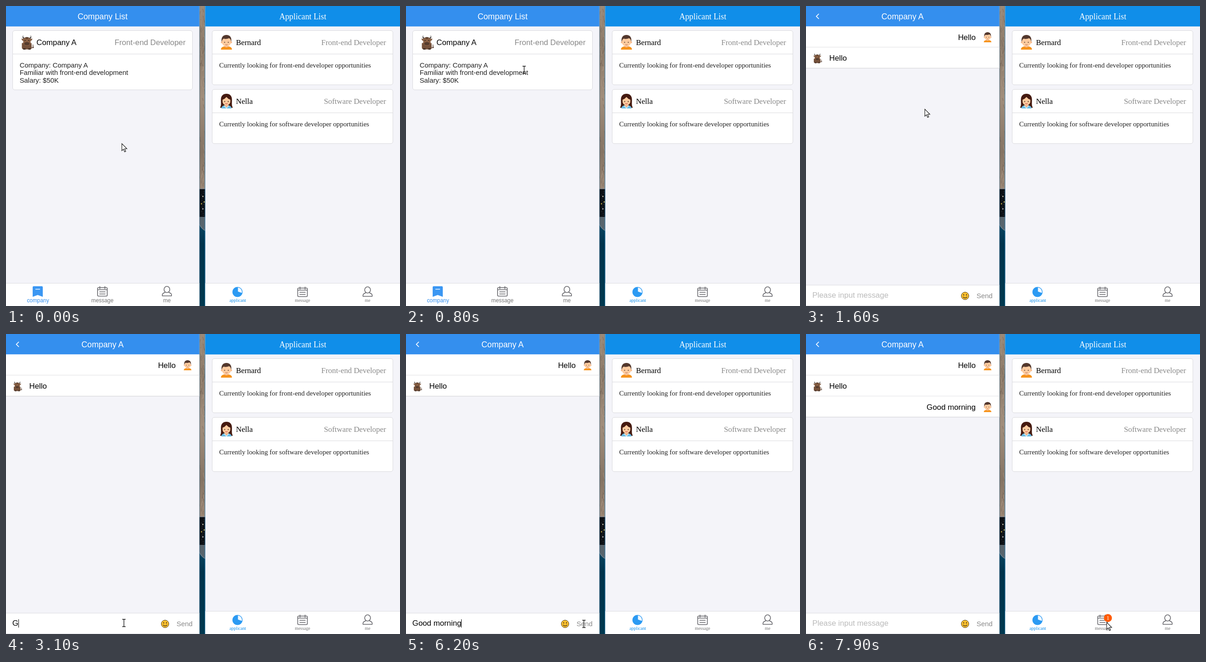
These frames come from a looping animation (857 px wide and 653 px high, 8 s). An HTML page:

```html
<!DOCTYPE html>
<html lang="en">
<head>
<meta charset="utf-8">
<title>Job chat</title>
<style>
  html, body { margin: 0; width: 100%; height: 100%; overflow: hidden; background: #f4f4f9; }
  svg { display: block; }
  text { white-space: pre; font-family: "Liberation Sans", Arial, sans-serif; }
  .serif text { font-family: "Liberation Serif", "Times New Roman", serif; }
  .line { fill: none; stroke: #66666b; stroke-width: 1.6; stroke-linecap: round; stroke-linejoin: round; }
</style>
</head>
<body>
<svg id="stage" width="857" height="653" viewBox="0 0 857 653">
  <defs>
    <linearGradient id="rock" x1="0" x2="0" y1="0" y2="1">
      <stop offset="0" stop-color="#9c8a78"/><stop offset=".25" stop-color="#8c7a69"/>
      <stop offset=".5" stop-color="#a18e7c"/><stop offset=".8" stop-color="#857464"/>
      <stop offset="1" stop-color="#9b8775"/>
    </linearGradient>
    <linearGradient id="sea" x1="0" x2="0" y1="0" y2="1">
      <stop offset="0" stop-color="#0b4a68"/><stop offset=".3" stop-color="#00334c"/>
      <stop offset="1" stop-color="#00384f"/>
    </linearGradient>
    <clipPath id="gap"><rect x="420" width="14" height="653"/></clipPath>

    <g id="boy">
      <path d="M-12 16C-12 11-8 9.500-4 9H4C8 9.500 12 11 12 16Z" fill="#f7941d"/>
      <path d="M-4 5H4V9.500Q0 13-4 9.500Z" fill="#eeb083"/>
      <circle cx="-10" cy="0" r="2.200" fill="#f5b88b"/>
      <circle cx="10" cy="0" r="2.200" fill="#f5b88b"/>
      <path d="M-9.500-9H9.500V0C9.500 6 4 9.500 0 9.500S-9.500 6-9.500 0Z" fill="#fdcb9f"/>
      <path d="M-10.500-1C-12-11-7-16 0-16S12-11 10.500-1L9-6Q7-8 6-9Q-1-6-6-8Q-8-7-9-5Z" fill="#53382d"/>
      <circle cx="-4" cy="0" r="1.100" fill="#4a342b"/><circle cx="4" cy="0" r="1.100" fill="#4a342b"/>
      <path d="M-2.500 5Q0 6.800 2.500 5" fill="none" stroke="#b5624a"/>
    </g>
    <g id="girl">
      <path d="M-14 14C-11 10-12 5-12-3C-12-12-7-16 0-16S12-12 12-3C12 5 11 10 14 14Q10 16 7 13H-7Q-10 16-14 14Z" fill="#451a10"/>
      <path d="M-11 16C-11 12-8 10-4 9H4C8 10 11 12 11 16Z" fill="#68bde5"/>
      <path d="M-4 5H4V10L0 14L-4 10Z" fill="#f0b489"/>
      <path d="M-5 10L0 15.500L5 10" fill="none" stroke="#d9f0fa" stroke-width="1.500"/>
      <path d="M-8.500-3Q-3-5 0-9Q3-5 8.500-3V1C8.500 6 4 9 0 9S-8.500 6-8.500 1Z" fill="#fdcb9f"/>
      <circle cx="-3.800" cy="1" r="1.100" fill="#3b211a"/><circle cx="3.800" cy="1" r="1.100" fill="#3b211a"/>
      <path d="M-2.500 5Q0 7 2.500 5" fill="none" stroke="#d24d4d" stroke-width="1.300"/>
    </g>
    <g id="bull">
      <path d="M9 12Q15 13 13 5" fill="none" stroke="#5c4030" stroke-width="1.300"/>
      <circle cx="13.500" cy="11" r="1.500" fill="#4a3429"/>
      <path d="M-11 2Q0-3 10 2L10.500 12Q10 15 7 15.500H-7Q-11 15-11 11Z" fill="#73503a"/>
      <path d="M-8 13H-3V16H-8ZM3 13H8V16H3Z" fill="#443127"/>
      <path d="M-5-10Q-9-10-8-16Q-12-9-6-7ZM5-10Q9-10 8-16Q12-9 6-7Z" fill="#4b4541"/>
      <path d="M-7-7L-12-8Q-11-3-7-3ZM7-7L12-8Q11-3 7-3Z" fill="#7b563c"/>
      <path d="M-8-8Q0-13 8-8L8 3Q5 8 0 8T-8 3Z" fill="#8a6044"/>
      <path d="M-5-10Q0-13 5-10L0-7Z" fill="#5d402e"/>
      <ellipse cy="3" rx="6" ry="3.500" fill="#553c2e"/>
      <circle cx="-4" cy="-4" r="1.100" fill="#221a16"/><circle cx="4" cy="-4" r="1.100" fill="#221a16"/>
    </g>

    <g id="note" class="line">
      <rect x="-10.500" y="-8.500" width="21" height="18.500" rx="2"/>
      <path d="M-5.500-11V-6M5.500-11V-6M-10-4H10M-6 .8H6M-6 5.200H6"/>
    </g>
    <g id="user" class="line">
      <ellipse cy="-4.500" rx="6.300" ry="6.800"/>
      <path d="M-4 1.500L-9 4.500Q-10.300 6-10 9.500H10Q10.300 6 9 4.500L4 1.500"/>
    </g>
    <path id="arrow" d="M0 .5V16L3.500 12.700L6 18.500L8.500 17.500L6 11.800H11Z" fill="#fff" stroke="#111" stroke-width="1.100"/>
    <path id="beam" d="M-3.500-8H-1Q0-8 0-7V7Q0 8-1 8H-3.500M3.500-8H1Q0-8 0-7M0 7Q0 8 1 8H3.500" fill="none" stroke="#111" stroke-width="1.300"/>
  </defs>
</svg>
<script>
const NS = 'http://www.w3.org/2000/svg';
const stage = document.getElementById('stage');
const LOOP = 8000, STEP = 100;
const TITLE = 17.8, BIG = 16.83, BODY = 14.85;
const LEFT_W = 420.5, RIGHT_X = 433.5, BAR_H = 44.5;

function add(parent, tag, attrs = {}, content) {
  const el = document.createElementNS(NS, tag);
  for (const k in attrs) el.setAttribute(k, attrs[k]);
  if (content !== undefined) el.textContent = content;
  parent.appendChild(el);
  return el;
}
const group = (p, attrs) => add(p, 'g', attrs);
const rect = (p, x, y, width, height, fill) => add(p, 'rect', { x, y, width, height, fill });
const label = (p, s, x, y, size, fill = '#000', anchor = 'start') =>
  add(p, 'text', { x, y, 'font-size': size, fill, 'text-anchor': anchor }, s);
const icon = (p, id, x, y, scale = 1) =>
  add(p, 'use', { href: '#' + id, transform: `translate(${x} ${y}) scale(${scale})` });
const show = (el, on) => el.setAttribute('visibility', on ? 'visible' : 'hidden');

function page(p, x, w, title, center, color) {
  rect(p, x, 0, w, 653, '#f4f4f9');
  rect(p, x, 0, w, BAR_H, color);
  label(p, title, center, 28.5, TITLE, '#fff', 'middle');
}

function card(p, x, y, w, h, who, name, role, lines) {
  add(p, 'rect', { x, y, width: w, height: h, rx: 4.5, fill: '#fff', stroke: '#dadade' });
  rect(p, x, y + 50.5, w, 1, '#dadade');
  icon(p, who, x + 31, y + 25.5);
  label(p, name, x + 51.8, y + 31.5, BIG);
  label(p, role, x + w - 15, y + 31.5, BIG, '#888', 'end');
  lines.forEach((s, i) => label(p, s, x + 15.2, y + 80 + i * 16.8, BODY, '#222'));
}

function tabs(p, x, w, centers, names, size, y, active, iconY) {
  rect(p, x, 603, w, 50, '#fff');
  rect(p, x, 603, w, 1, '#dcdce0');
  names.forEach((s, i) => label(p, s, centers[i], y, size, i ? '#757575' : active, 'middle'));
  icon(p, 'note', centers[1], iconY);
  icon(p, 'user', centers[2], iconY);
}

// Desktop seen between the two windows
const desk = group(stage, { 'clip-path': 'url(#gap)' });
rect(desk, 420, 0, 14, 398, 'url(#rock)');
let seed = 7;
const rnd = () => (seed = seed * 16807 % 2147483647) / 2147483647;
for (let i = 0; i < 60; i++) {
  const x = 420 + rnd() * 12, y = rnd() * 395;
  add(desk, 'path', {
    d: `M${x} ${y}q${rnd() * 8 - 4} ${rnd() * 8} ${rnd() * 8 - 4} ${6 + rnd() * 10}`,
    fill: 'none', stroke: rnd() < .55 ? '#65564a' : '#b9a693', 'stroke-width': .7 + rnd(), opacity: .4
  });
}
rect(desk, 420, 397, 14, 62, '#0c0f14');
rect(desk, 420, 397, 14, 1.5, '#8f9296');
for (let i = 0; i < 14; i++) rect(desk, 422 + rnd() * 8, 403 + i * 4, 3, 1, '#2a3038');
for (const [x, y, c] of [[427, 413, '#a5a596'], [424, 429, '#a09040'], [430, 425, '#b0a45a'], [427, 440, '#95999c']])
  rect(desk, x, y, 2.5, 3, c);
rect(desk, 420, 459, 14, 194, 'url(#sea)');
add(desk, 'path', { d: 'M420 459H434V490Q426 487 420 476Z', fill: '#58646d' });
add(desk, 'path', { d: 'M420 474Q426 486 434 489', fill: 'none', stroke: '#8298a5' });
rect(desk, LEFT_W, 0, 1, 653, '#3a6f90');
rect(desk, RIGHT_X - 1, 0, 1, 653, '#2181bd');

// Left window: list page
const list = group(stage);
page(list, 0, LEFT_W, 'Company List', 210, '#348fee');
card(list, 14.5, 53.5, 391, 129, 'bull', 'Company A', 'Front-end Developer',
  ['Company: Company A', 'Familiar with front-end development', 'Salary: $50K']);
tabs(list, 0, LEFT_W, [69.5, 209.7, 350], ['company', 'message', 'me'], 11.9, 645, '#348fee', 621.5);
add(list, 'path', { d: 'M60 610H78Q80 610 80 612V633L69 629L58 633V612Q58 610 60 610Z', fill: '#3b97f3' });
add(list, 'path', { d: 'M64 616.500H74', stroke: '#fff', 'stroke-width': 1.4 });

// Left window: chat page
const chat = group(stage);
page(chat, 0, LEFT_W, 'Company A', 210, '#348fee');
add(chat, 'path', { d: 'M28 17L22.500 22.500L28 28', fill: 'none', stroke: '#fff', 'stroke-width': 1.7 });
function bubble(i, text, mine) {
  const g = group(chat), y = BAR_H + i * 45.5;
  rect(g, 0, y, LEFT_W, 45.5, '#fff');
  rect(g, 0, y + 44.7, LEFT_W, 1.3, '#d9d9dd');
  label(g, text, mine ? 369 : 50.5, y + 29, BIG, '#000', mine ? 'end' : 'start');
  icon(g, mine ? 'boy' : 'bull', mine ? 395 : 24.5, y + 23.5, .69);
  return g;
}
bubble(0, 'Hello', true);
bubble(1, 'Hello', false);
const sent = bubble(2, 'Good morning', true);
rect(chat, 0, 607, LEFT_W, 46, '#fff');
rect(chat, 0, 607, LEFT_W, 1, '#dcdce0');
rect(chat, 0, 652, LEFT_W, 1, '#dcdce0');
const hint = label(chat, 'Please input message', 13.8, 635.3, BIG, '#bbb');
const input = label(chat, '', 13.8, 635.3, BIG);
const caret = rect(chat, 14, 621, 1, 18, '#000');
add(chat, 'circle', { cx: 346, cy: 631, r: 8.2, fill: '#fcc030', stroke: '#4c3a1c', 'stroke-width': 1 });
add(chat, 'path', { d: 'M343 627.500V630M349 627.500V630', stroke: '#3a2c18', 'stroke-width': 1.8 });
add(chat, 'path', { d: 'M341.500 633Q346 638 350.500 633', fill: 'none', stroke: '#3a2c18', 'stroke-width': 1.2 });
label(chat, 'Send', 371, 636.3, BODY, '#888');

// Right window
const right = group(stage, { class: 'serif' });
page(right, RIGHT_X, 857 - RIGHT_X, 'Applicant List', 645.5, '#108ee9');
card(right, 448.5, 53.5, 393, 118, 'boy', 'Bernard', 'Front-end Developer',
  ['Currently looking for front-end developer opportunities']);
card(right, 448.5, 181.5, 393, 118, 'girl', 'Nella', 'Software Developer',
  ['Currently looking for software developer opportunities']);
tabs(right, RIGHT_X, 857 - RIGHT_X, [504, 645, 786.5], ['applicant', 'message', 'me'], 9.9, 644, '#108ee9', 622.5);
add(right, 'circle', { cx: 503.5, cy: 622.5, r: 11, fill: '#2b9af3' });
add(right, 'path', { d: 'M504.500 621.500V612.800A9.700 9.700 0 0 1 513 624.500Z', fill: '#f2f8fe' });
const badge = group(right);
add(badge, 'circle', { cx: 656.7, cy: 618.2, r: 8.7, fill: '#ff5b05' });
label(badge, '1', 656.7, 622.3, 11.9, '#fff', 'middle');

const arrow = icon(stage, 'arrow', 0, 0);
const beam = icon(stage, 'beam', 0, 0);

// Timeline
const OPEN = 1200, FOCUS = 2300, SEND = 6800, ALERT = 6900;
const TEXT = 'Good morning';
const KEYS = [3100, 3300, 3500, 3700, 3900, 4100, 4300, 4500, 4700, 4900, 5000, 5200];
const PATH = [
  [0, 252, 299], [700, 257, 139], [1200, 257, 139], [1600, 258.5, 224], [1800, 258, 240],
  [2300, 256.5, 629], [5800, 256.5, 629], [6200, 387, 631], [6900, 387, 631],
  [7500, 697, 626], [7900, 654, 627]
];

function pointer(t) {
  const i = PATH.findIndex(p => p[0] > t);
  if (i < 0) return PATH[PATH.length - 1].slice(1);
  const [t0, x0, y0] = PATH[i - 1], [t1, x1, y1] = PATH[i];
  const u = (t - t0) / (t1 - t0), e = u * u * (3 - 2 * u);
  return [x0 + (x1 - x0) * e, y0 + (y1 - y0) * e];
}

function draw(t) {
  const typing = t < SEND;
  const count = typing ? KEYS.filter(k => k <= t).length : 0;
  const last = count ? KEYS[count - 1] : FOCUS;
  show(list, t < OPEN);
  show(chat, t >= OPEN);
  show(sent, t >= SEND);
  show(badge, t >= ALERT);
  show(hint, t >= OPEN && !count);
  input.textContent = TEXT.slice(0, count);
  show(input, count > 0);
  caret.setAttribute('x', Math.round(13.8 + (count ? input.getComputedTextLength() : 0)));
  show(caret, t >= FOCUS && typing && Math.floor((t - last) / 500) % 2 === 0);

  const [x, y] = pointer(t);
  const overText = t < OPEN ? y < 171 && y > 120 : y > 608 && x < 410;
  for (const el of [arrow, beam]) el.setAttribute('transform', `translate(${x} ${y})`);
  show(arrow, !overText);
  show(beam, overText);
}

const start = performance.now();
function tick() {
  const t = (performance.now() - start) % LOOP;
  draw(Math.floor(t / STEP) * STEP);
  requestAnimationFrame(tick);
}
draw(0);
requestAnimationFrame(tick);
</script>
</body>
</html>
```
